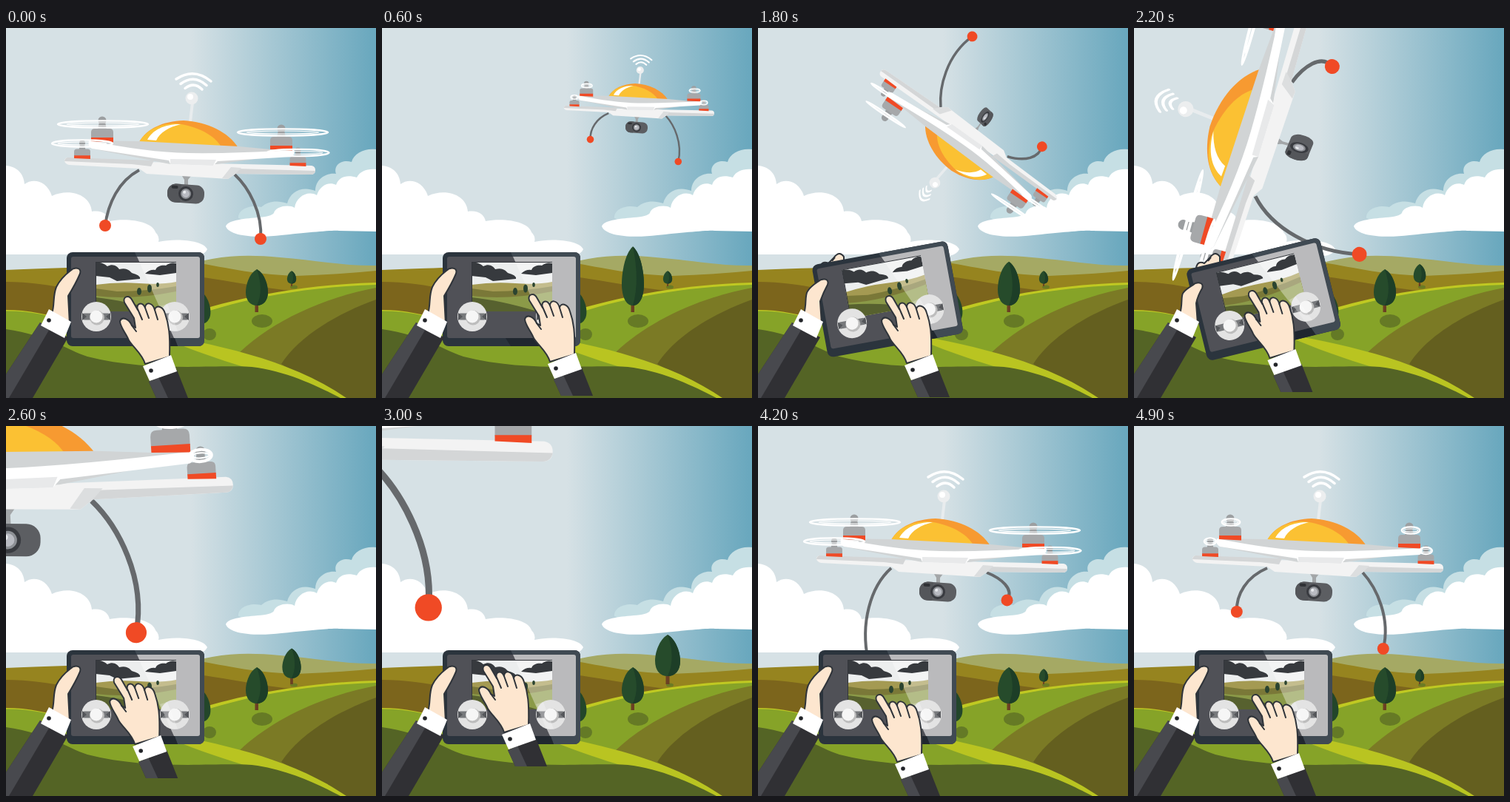
These frames come from a looping animation (500x500 px, 5 s). An HTML page:

```html
<!DOCTYPE html>
<html lang="en">
<head>
<meta charset="utf-8">
<title>Drone flight</title>
<style>
html, body { margin: 0; width: 100%; height: 100%; overflow: hidden; background: #d6e1e5; }
svg { display: block; width: 100vw; height: 100vh; }
.ring { fill: none; stroke: #fff; }
.leg { fill: none; stroke: #66696c; stroke-width: 4; }
.foot { fill: #f04a25; }
.skin { fill: #fde6cf; stroke: #2f343a; stroke-width: 2; stroke-linejoin: round; stroke-linecap: round; }
</style>
</head>
<body>
<svg viewBox="0 0 500 500" xmlns="http://www.w3.org/2000/svg">
<defs>
  <linearGradient id="sky" gradientUnits="userSpaceOnUse" x1="250" y1="0" x2="495" y2="0">
    <stop offset="0" stop-color="#d6e1e5"/>
    <stop offset="1" stop-color="#6aa8be"/>
  </linearGradient>
  <clipPath id="screenClip"><rect x="121" y="316" width="109" height="67"/></clipPath>
  <g id="motor">
    <circle cx="0" cy="-24" r="5.5" fill="#9c9fa1"/>
    <path d="M-4,-22H4L6,-12H-6Z" fill="#9c9fa1"/>
    <path d="M-15,0V-8Q-15,-13 -10,-13H10Q15,-13 15,-8V0Z" fill="#a6a8aa"/>
    <path d="M-15,-1H15V5.500L-15,4Z" fill="#f04a25"/>
  </g>
  <g id="stick">
    <circle r="20" fill="#e3e3e3"/>
    <rect x="-19" y="-4.500" width="38" height="9" rx="3" fill="#77797c"/>
    <path d="M-13,0 -19,-5V5ZM13,0 19,-5V5Z" fill="#55575b"/>
    <circle cx="1" cy="1.500" r="10" fill="#bdbdbd"/>
    <circle r="8.500" fill="#f6f6f6"/>
  </g>
</defs>

<rect width="500" height="500" fill="url(#sky)"/>

<!-- clouds -->
<path d="M0,186C14,187 24,196 25,211C37,202 56,207 62,227C86,216 114,225 116,248C130,246 138,252 140,261C166,256 198,262 202,276Q208,282 206,289C228,284 266,286 272,299C268,308 256,308 246,310L230,306H0Z" fill="#fff"/>
<path d="M314,257C313,246 328,238 345,242C355,233 368,233 380,237C384,221 400,213 418,220C418,205 432,195 446,197C442,185 454,177 467,181C470,169 485,162 500,164V250L330,264Z" fill="#c6dfe4"/>
<path d="M297,268C300,260 318,258 340,256Q358,255 362,250C364,241 382,238 390,243C392,228 408,219 420,226C424,213 436,207 446,212C450,200 462,198 474,202C479,193 488,190 500,191V275L450,274C440,273 404,277 372,280C340,284 302,282 297,268Z" fill="#fff"/>

<!-- hills -->
<path d="M225,326C280,307 320,305 370,310C420,314 460,322 500,321V350H225Z" fill="#a5a964"/>
<path d="M0,327C60,324 160,323 250,316C290,322 330,333 392,335Q450,333 500,328V500H0Z" fill="#96841f"/>
<path d="M0,343C30,343 60,347 90,354L240,335C280,336 320,348 386,355L268,384 0,400Z" fill="#7c651c"/>
<path d="M0,381C30,381 60,387 90,398L240,388C300,368 390,347 500,344V500H0Z" fill="#c0c922"/>
<path d="M0,382.500C30,382 60,388 90,399L240,394C300,371 390,350 500,347V500H0Z" fill="#86a328"/>
<path d="M500,351C430,364 360,396 316,438L420,482 500,500Z" fill="#7b7a25"/>
<path d="M500,367C450,385 397,415 372,454L420,482 456,500H500Z" fill="#645f1f"/>
<path d="M190,410C280,428 380,445 460,500H440C390,474 320,462 235,428Z" fill="#b9c421"/>
<path d="M0,407C60,416 80,434 110,444C200,467 295,453 340,459C385,466 425,486 452,500H0Z" fill="#546425"/>

<!-- trees -->
<ellipse cx="346" cy="396" rx="14" ry="9" fill="#667a25"/>
<ellipse cx="275" cy="414" rx="9" ry="8" fill="#647a26"/>
<ellipse cx="389" cy="350" rx="5" ry="2.500" fill="#6b7b24"/>
<rect x="264" y="390" width="4" height="16" fill="#6b4023"/>
<path d="M264,356C274,364 279,382 275,392Q271,400 264,400Z" fill="#23462a"/>
<rect x="336.500" y="370" width="4.500" height="14" fill="#6b4023"/>
<g id="treeA">
  <path d="M339,326C328,332 324,348 324,357C324,368 330,375 339,375C348,375 354,368 354,357C354,348 350,332 339,326Z" fill="#264b2b"/>
  <path d="M339,326C350,332 354,348 354,357C354,368 348,375 339,375C346,360 345,344 339,326Z" fill="#1d3e27"/>
</g>
<g id="treeB">
  <rect x="-2.500" y="-14" width="5" height="14" fill="#6b4023"/>
  <path d="M0,-67C-12,-60 -17,-42 -17,-32C-17,-18 -10,-11 0,-11C10,-11 17,-18 17,-32C17,-42 12,-60 0,-67Z" fill="#264b2b"/>
  <path d="M0,-67C12,-60 17,-42 17,-32C17,-18 10,-11 0,-11C8,-28 7,-48 0,-67Z" fill="#1d3e27"/>
</g>

<!-- drone -->
<g id="drone">
  <path id="legL" class="leg"/><path id="legR" class="leg"/>
  <circle id="footL" class="foot" r="8"/><circle id="footR" class="foot" r="8"/>
  <g id="cam">
    <path d="M238,200H250L246,205V213H241V205Z" fill="#a3a6a8"/>
    <g transform="rotate(4 243 224)">
      <rect x="218" y="211.500" width="50" height="25" rx="11" fill="#5c5e62"/>
      <path d="M218,224a11,12 0 0 1 11,-12.500H236V236.500H229A11,12 0 0 1 218,224Z" fill="#54565a"/>
      <rect x="223" y="214" width="9" height="4" rx="2" fill="#2f3135"/>
      <circle cx="243" cy="224" r="10" fill="#393b40"/>
      <circle cx="243" cy="224" r="7" fill="#8d9095"/>
      <circle cx="243" cy="224" r="5" fill="#b9bbc2"/>
      <circle cx="241" cy="222" r="2" fill="#e9ebee"/>
    </g>
  </g>
  <path d="M84,175 190,181 320,184 413,186Q418,187 418,192Q418,198 412,198L310,197 300,204 190,197 180,190 85,185Q79,183 79,179Q80,175 84,175Z" fill="#f3f3f3"/>
  <path d="M84,175 200,179 196,187 170,184 79,180Q80,175 84,175ZM310,190 418,193Q417,198 412,198L308,197Z" fill="#d4d6d7"/>
  <path d="M318,189 310,197 300,204 292,203 304,188Z" fill="#dcdedf"/>
  <use href="#motor" transform="translate(103 173) scale(.73)"/>
  <use href="#motor" transform="translate(394.500 183) scale(.73)"/>
  <path d="M247,126 250,101 254,101 251,126Z" fill="#e8ecee"/>
  <circle cx="251" cy="95" r="8.500" fill="#eceeef"/><circle cx="249" cy="93" r="4" fill="#fff"/>
  <g id="wifi" fill="none" stroke="#fff" stroke-width="3.500" stroke-linecap="round">
    <path d="M230,69Q254,53 277,72M236,75.500Q254,62 271,77.500M242,81.500Q254,72 265,83"/>
  </g>
  <path d="M180,154C190,136 212,126 240,125C272,127 300,140 314,162L180,158Z" fill="#f79a31"/>
  <path d="M180,154C190,137 208,129 230,129C260,133 282,145 291,161L180,158Z" fill="#fbc133"/>
  <path d="M191,151C198,138 213,130 236,130C220,134 208,141 203,152Z" fill="#fff"/>
  <path d="M113,152 180,153 314,160 357,164 390,165Q391,169 388,170L285,184H222L116,163Q110,160 113,152Z" fill="#d1d4d5"/>
  <path d="M112,152Q190,168 246,169T389,165Q391,171 386,174L286,180 280,186 222,184 220,179 116,163Q110,160 112,152Z" fill="#fff"/>
  <path d="M222,177 284,178 280,186 222,184Z" fill="#e8e9ea"/>
  <use href="#motor" transform="translate(130 149)"/>
  <use href="#motor" transform="translate(372 160)"/>
  <g id="props"></g>
</g>

<!-- hand behind the tablet -->
<path class="skin" d="M84,350V324Q86,314 95,318L102,311Q110,300 116,309V350Z"/>
<path d="M100,315 104,310" stroke="#2f343a" stroke-width="2"/>

<g id="tablet">
  <rect x="82" y="303" width="186" height="127" rx="8" fill="#2b343d"/>
  <path d="M174,303H260Q268,303 268,311V422Q268,430 260,430H232Z" fill="#404a53"/>
  <path d="M167,419H228L232,430H174Z" fill="#20272f"/>
  <rect x="88" y="309" width="174" height="110" rx="3" fill="#505157"/>
  <path d="M177,309H259Q262,309 262,312V416Q262,419 259,419H227Z" fill="#bababc"/>
  <g clip-path="url(#screenClip)">
    <rect x="121" y="316" width="109" height="67" fill="#eceeee"/>
    <path d="M121,347Q150,343 180,345T230,343V383H121Z" fill="#a49a52"/>
    <path d="M121,352 150,356Q190,356 230,349V383H121Z" fill="#7a7838"/>
    <path d="M121,362Q170,368 230,356V383H121Z" fill="#8b9a48"/>
    <path d="M121,364Q160,368 210,383H121Z" fill="#57612f"/>
    <path d="M180,316H230V383H210Z" fill="#fff" opacity=".35"/>
    <path d="M121,317C130,316 134,320 137,322C145,318 150,322 153,326C164,323 168,329 170,331Q182,334 181,339L150,342 140,337 121,335Z" fill="#373a3e"/>
    <path d="M188,332Q194,326 202,327C204,321 212,320 216,321Q222,316 230,318V331L208,334Z" fill="#373a3e"/>
    <g fill="#2b4430">
      <ellipse cx="180" cy="356" rx="3" ry="5"/><ellipse cx="194" cy="352" rx="3" ry="5.500"/><ellipse cx="205" cy="347" rx="1.800" ry="3"/>
    </g>
    <path d="M121,383V316H230" fill="none" stroke="#33363b" stroke-width="2"/>
  </g>
  <use href="#stick" x="122" y="390"/>
  <use href="#stick" x="228" y="390"/>
  <path d="M208,376 218,373 232,409H222Z" fill="#fff" opacity=".25"/>
</g>

<!-- left arm -->
<path d="M46,398 84,418 36,500H0V468Z" fill="#303034"/>
<path d="M46,398 60,405 4,500H0V468Z" fill="#48494e"/>
<path id="thumb" class="skin"/>
<path d="M58,380 88,397 79,419 47,402Z" fill="#fff"/>
<circle cx="58" cy="395" r="2.800" fill="#222428"/>

<!-- right arm -->
<g id="hand">
  <path d="M193,478 231,462 246,500H203Z" fill="#303034"/>
  <path d="M193,478 206,472 219,500H203Z" fill="#48494e"/>
  <path class="skin" d="M188,454C184,440 172,432 166,422C162,412 154,404 154,396C157,389 166,393 170,402L175,405 173,392 160,371C157,363 166,360 170,367L178,381C175,372 184,369 188,378C188,370 198,370 201,381C202,374 212,375 215,386C220,400 222,414 221,444Z"/>
  <path d="M178,380 184,394M188,378 193,392M201,381 205,394M170,402 176,410" fill="none" stroke="#2f343a" stroke-width="2" stroke-linecap="round"/>
  <path d="M185,457 223,442 231,464 194,477Z" fill="#fff"/>
  <circle cx="196" cy="463" r="2.800" fill="#222428"/>
</g>
</svg>

<script>
const LOOP = 5000, STEP = 100;
const $ = id => document.getElementById(id);
const set = (id, name, value) => $(id).setAttribute(name, value);

// Piecewise linear value from [time, value] pairs.
function at(keys, t) {
  for (let i = 1; i < keys.length; i++) {
    const [a, va] = keys[i - 1], [b, vb] = keys[i];
    if (t <= b) return va + (vb - va) * (t - a) / (b - a);
  }
  return keys[keys.length - 1][1];
}

const trip = (mid, t) => Math.max(0, 1 - Math.abs(t - mid) / 1000);
const SPIN = [[0, 0], [600, 0], [2620, 360], [LOOP, 360]];
const TILT = [[0, 0], [600, 0], [2200, -13.8], [2600, 0], [LOOP, 0]];
const TURN = [[0, 1], [600, 1], [1400, .3], [2200, .55], [2600, 1], [LOOP, 1]];
const SWING = [[0, 0], [250, -62], [500, 0], [750, 40], [1000, 0]];
const BLADE = [1, 1, 1, 1, 1, 1, .2, .6, .6, .2];
const PROPS = [[131, 130, 61], [374, 141, 61], [103, 156, 41], [394.5, 168.5, 42]];

$('props').innerHTML = PROPS.map(([x, y]) =>
  `<g class="blade"><ellipse class="ring" cx="${x}" cy="${y}" stroke-width="2.4"/>` +
  `<ellipse class="ring" cx="${x}" cy="${y}" stroke-width="1.2"/></g>`).join('');
const blades = [...document.querySelectorAll('.blade')];

const stretchX = (cx, k) => `translate(${cx * (1 - k)} 0) scale(${k} 1)`;

function drawLeg(side, x0, y0, bend, bulge, x, y) {
  const h = y - y0;
  set('leg' + side, 'd', `M${x0},${y0}C${bend},${y0 + h * .2} ${bulge},${y0 + h * .6} ${x},${y}`);
  set('foot' + side, 'cx', x);
  set('foot' + side, 'cy', y);
}

function drawBlades(spread, flat) {
  blades.forEach((b, i) => [1, .8].forEach((part, j) => {
    const ring = b.children[j];
    ring.setAttribute('rx', PROPS[i][2] * spread * part);
    ring.setAttribute('ry', (j ? 2 : 4.6) * flat);
  }));
}

function drawDrone(t, far, near) {
  const x = 245 + 167 * far - 407 * near, y = 165 - 110 * far - 192 * near;
  const size = 1 - .667 * far + 1.27 * near;
  set('drone', 'transform',
    `translate(${x} ${y}) scale(${size}) translate(-245 -165) rotate(${at(SPIN, t)} 247.5 176)`);
  const d = at(SWING, t % 1000), pull = Math.abs(d) * .3;
  drawLeg('L', 180, 192, 152, 138, 134 + pull, 267 - d);
  drawLeg('R', 309, 198, 328, 347, 344 - pull - d * .15, 285 + d);
  const turn = at(TURN, t);
  set('cam', 'transform', stretchX(243, turn));
  set('wifi', 'transform', stretchX(254, turn));
  drawBlades(BLADE[Math.floor(t % 1000 / STEP)], turn);
}

function drawThumb(tilt) {
  const u = -tilt / 14, x = -8 * u, y = 20 * u;
  set('thumb', 'd', `M62,386C66,374 63,362 ${68 + x * .2},${350 + y * .4}` +
    `Q${74 + x * .6},${338 + y * .8} ${87 + x},${328 + y}` +
    `C${92 + x},${323 + y} ${103 + x},${323 + y} ${100 + x},${332 + y}` +
    `Q${94 + x},${346 + y * .8} 84,${362 + y * .5}L86,400 70,396Z`);
}

function draw(t) {
  const far = trip(1000, t), near = trip(3000, t);
  drawDrone(t, far, near);
  set('treeA', 'transform', `translate(0 ${-375 * 1.05 * far}) scale(1 ${1 + 1.05 * far})`);
  set('treeB', 'transform',
    `translate(386 349) scale(${.36 + .64 * near} ${.31 + .69 * near})`);
  const tilt = at(TILT, t);
  set('tablet', 'transform', `rotate(${tilt} 175 366)`);
  drawThumb(tilt);
  set('hand', 'transform',
    `translate(${65 * far - 23 * near} ${-5 * far - 40 * near})`);
}

const start = performance.now();
function tick() {
  const t = (performance.now() - start) % LOOP;
  draw(Math.floor(t / STEP) * STEP);
  requestAnimationFrame(tick);
}
draw(0);
tick();
</script>
</body>
</html>
```
